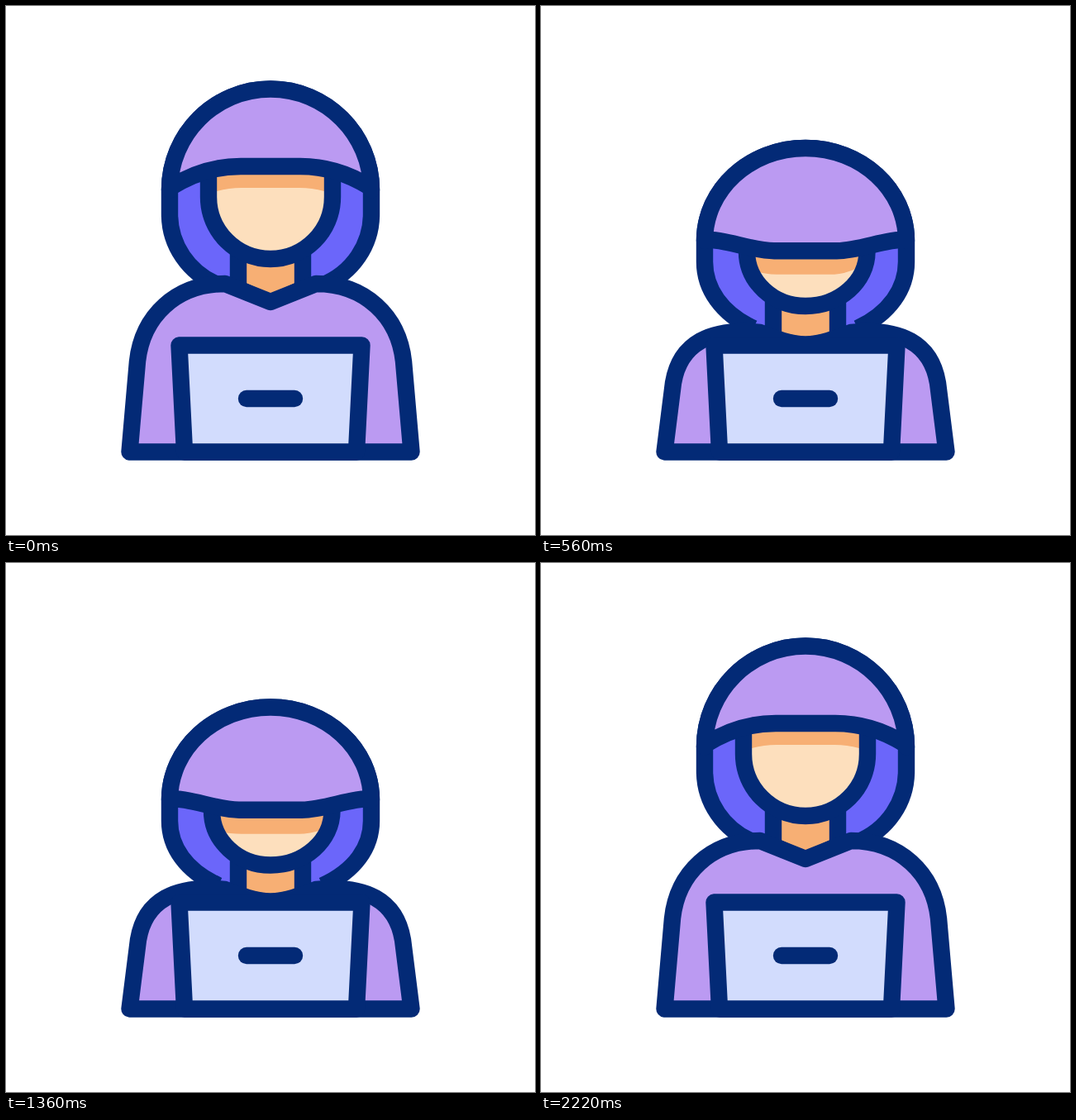
An HTML page for the animation above (2.42 s loop, 640 by 640 pixels).

```html
<!DOCTYPE html>
<html lang="en">
<head>
<meta charset="utf-8">
<title>Hooded figure at a laptop</title>
<style>
  html, body { margin: 0; width: 100%; height: 100%; overflow: hidden; background: #fff; }
  svg { display: block; width: 100%; height: 100%; }
  path { stroke-width: 20.4; stroke-linejoin: round; }
</style>
</head>
<body>
<svg viewBox="0 0 640 640"></svg>
<script>
const INK = '#032a76', PURPLE = '#bb9af2', BLUE = '#6b66fa';
const SKIN = '#fddfbd', SHADE = '#f7af74', SCREEN = '#d2dcfd';
const LOOP = 2420, STEP = 20, BOB = 7.4;

// Each part has its upright pose, its ducked pose and, if different, its lowest pose.
const face = [
  'M245 200V231C245 272.4 278.6 306 320 306C361.4 306 395 272.4 395 231V200',
  'M249 294V296C249 332.5 280.8 362 320 362C361 362 394.5 332.5 394.5 296V294'
];
const parts = [
  { fill: BLUE, stroke: INK, head: true, poses: [
    'M258 338C220 323 198 288 198 252V222.5C198 155.1 252.6 100.5 320 100.5C387.4 100.5 442 155.1 442 222.5V252C442 288 420 323 382 338',
    'M257 390C219 372 198 342 198 308.5V283C198 221 252.6 171 320 171C387.4 171 442 221 442 283V308.5C442 342 421 372 383 390',
    'M257 383C216 365 198 338 198 308.5V283C198 221 252.6 171 320 171C387.4 171 442 221 442 283V308.5C442 338 424 365 383 383'] },
  { fill: SHADE, stroke: INK, poses: [
    'M281 300V342L320 360L359 342V300',
    'M281 356V404L320 411L359 404V356'] },
  { fill: PURPLE, stroke: INK, poses: [
    'M320 358C301.7 350.7 283.3 343.3 265 336C206 336 165 375 159 430L149.5 539.5H490.5L481 430C475 375 434 336 375 336C356.7 343.3 338.3 350.7 320 358Z',
    'M320 409.5C302 409.5 283 402 265 395C205 389 168 408 160 456L149.5 539.5H490.5L480 456C472 408 435 389 375 395C357 402 338 409.5 320 409.5Z'] },
  { fill: SKIN, head: true, poses: face },
  { fill: SHADE, head: true, poses: [
    'M255 200V224Q270 220 285 220H355Q370 220 385 224V200Z',
    'M255 295V318Q272 323.5 285 323.5H355Q366 323.5 385 314V295Z',
    'M255 295V325Q272 325 285 325H355Q366 325 385 324V295Z'] },
  { fill: 'none', stroke: INK, head: true, poses: face },
  { fill: PURPLE, stroke: INK, head: true, poses: [
    'M200 219C222 205 250 194 284 194H356C390 194 418 205 440 219L442 222.5C442 155.1 387.4 100.5 320 100.5C252.6 100.5 198 155.1 198 222.5Z',
    'M200 281.5C225 281.5 255 295.2 282 295.2H358C385 295.2 415 281.5 440 281.5L442 283C442 221 387.4 171 320 171C252.6 171 198 221 198 283Z'] },
  { fill: SCREEN, stroke: INK, poses: ['M209.5 410.5H430.5L424 539.5H216Z'] },
  { fill: 'none', stroke: INK, cap: 'round', poses: ['M291 475H349'] }
];

// Time and pose reached: upright 0, ducked 1, lowest 2
const keys = [[0, 0], [400, 1], [1100, 2], [1600, 1], [2220, 0], [LOOP, 0]];

const svg = document.querySelector('svg');
for (const part of parts) {
  part.el = document.createElementNS(svg.namespaceURI, 'path');
  part.el.setAttribute('fill', part.fill);
  part.el.setAttribute('stroke', part.stroke || 'none');
  part.el.setAttribute('stroke-linecap', part.cap || 'butt');
  part.el.setAttribute('d', part.poses[0]);
  svg.append(part.el);
}

const number = /[\d.]+/g;

function blend(from, to, amount) {
  const ends = to.match(number);
  let i = 0;
  return from.replace(number, n => (+n + (ends[i++] - n) * amount).toFixed(2));
}

function poseAt(time) {
  const i = keys.findIndex(key => key[0] > time);
  const [t0, p0] = keys[i - 1], [t1, p1] = keys[i];
  const x = (time - t0) / (t1 - t0);
  return p0 + (p1 - p0) * x * x * (3 - 2 * x);
}

function draw(now) {
  const pose = poseAt(Math.floor(now % LOOP / STEP) * STEP);
  const low = Math.max(0, pose - 1);
  for (const { el, head, poses: [up, down, lowest = down] } of parts) {
    if (!down) continue;
    el.setAttribute('d', low ? blend(down, lowest, low) : blend(up, down, pose));
    if (head) el.setAttribute('transform', `translate(0 ${BOB * low})`);
  }
}

const start = performance.now();
function tick() {
  draw(performance.now() - start);
  requestAnimationFrame(tick);
}
tick();
</script>
</body>
</html>
```
